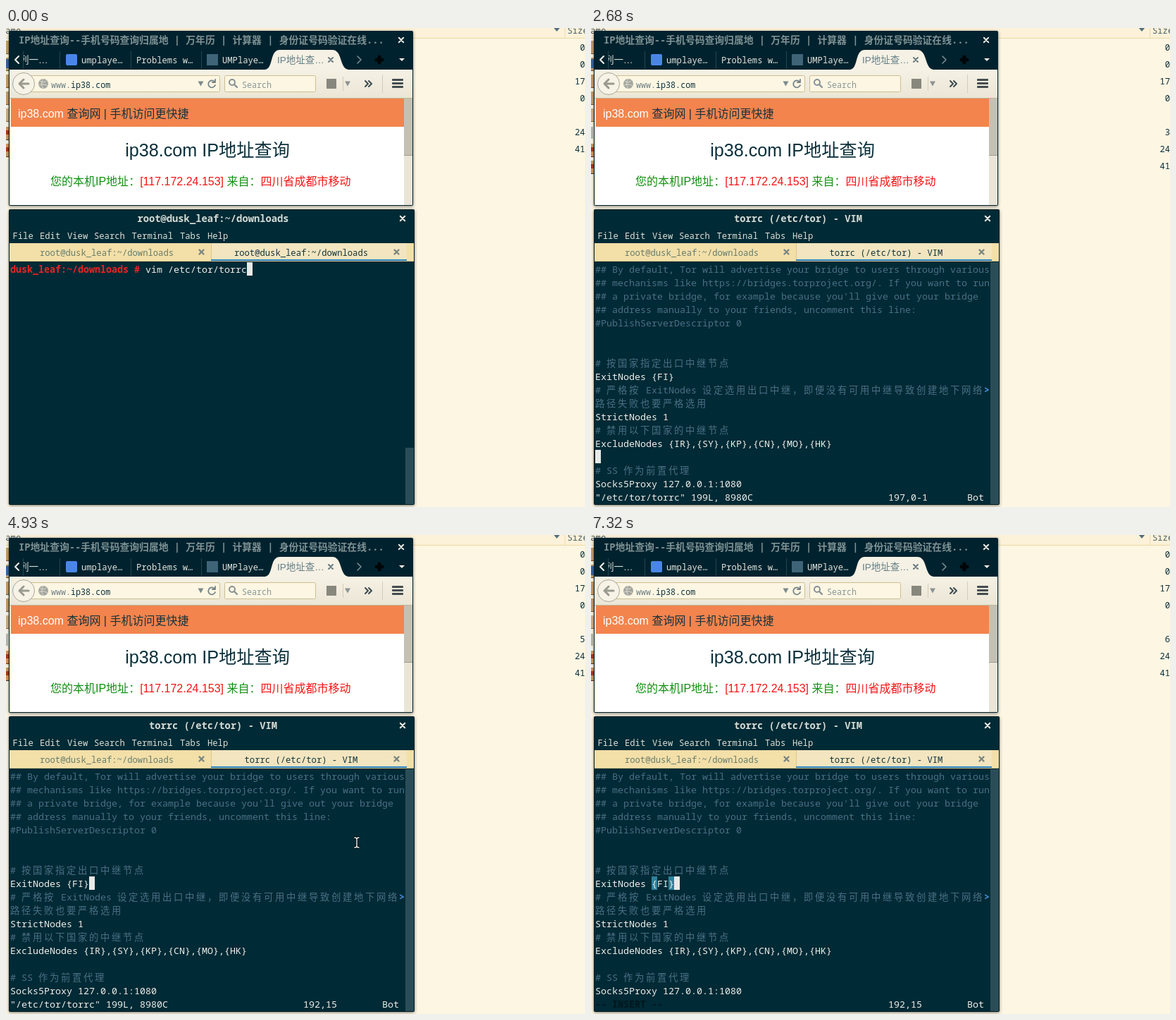
Animation of 822 by 679 pixels, one loop 8000 ms. Source, as an HTML page:

```html
<!DOCTYPE html>
<html lang="zh-CN">
<head>
<meta charset="utf-8">
<title>torrc</title>
<style>
  html, body { margin: 0; width: 100%; height: 100%; overflow: hidden; background: #fdf6e3; }
  svg { display: block; width: 822px; height: 679px; }
  text { white-space: pre; font-family: "Noto Sans Mono", "Noto Sans CJK SC", monospace; font-size: 12.2px; }
  .page { font-family: "Liberation Sans", "Noto Sans CJK SC", sans-serif; font-size: 16px; }
  .colon { font-family: "Noto Sans CJK TC", sans-serif; }
  .small { font-size: 13.5px; }
  .title { font-size: 13.8px; font-weight: bold; }
  .cell { font-size: 13.33px; }
  .mid { text-anchor: middle; }
  .end { text-anchor: end; }
  .bold { font-weight: bold; }
  .line { fill: none; stroke-linecap: round; stroke-linejoin: round; }
</style>
</head>
<body>
<svg id="stage" viewBox="0 0 822 679">
  <defs>
    <filter id="shadow" x="-5%" y="-5%" width="110%" height="110%">
      <feDropShadow dx="0" dy="1" stdDeviation="2" flood-color="#000" flood-opacity=".5"/>
    </filter>
    <linearGradient id="bar" x2="0" y2="1"><stop stop-color="#f5f1e4"/><stop offset="1" stop-color="#ebe6d6"/></linearGradient>
  </defs>
</svg>
<script>
const LOOP = 8000, CELL = 8, LINE = 19, LEFT = 6, TOP = 332;
const DARK = '#002b36', INK = '#0b303b', LIGHT = '#eeeeea', NOTE = '#4b6f85';
const stage = document.getElementById('stage');

function add(tag, attrs, parent = stage) {
  const el = document.createElementNS('http://www.w3.org/2000/svg', tag);
  for (const key in attrs) el.setAttribute(key, attrs[key]);
  return parent.appendChild(el);
}
const group = (attrs, parent) => add('g', attrs, parent);
const rect = (x, y, width, height, fill, parent, more) =>
  add('rect', { x, y, width, height, fill, ...more }, parent);
const path = (d, attrs, parent) => add('path', { d, ...attrs }, parent);
const line = (d, stroke, width = 1, parent) =>
  path(d, { class: 'line', stroke, 'stroke-width': width }, parent);
function text(x, y, content, fill, cls = '', parent) {
  const el = add('text', { x, y, fill, class: cls }, parent);
  el.textContent = content;
  return el;
}
const cross = (x, y, r, color, width) =>
  line(`M${x - r} ${y - r}l${2 * r} ${2 * r}m0 ${-2 * r}l${-2 * r} ${2 * r}`, color, width);
const down = (x, y, w, h, fill) => path(`M${x - w} ${y - h}h${2 * w}l${-w} ${2 * h}z`, { fill });

// Terminal text sits on a cell grid; CJK characters take two cells.
const isWide = c => c > '\u2e80';
const cellX = col => LEFT + col * CELL;
const rowY = row => TOP + row * LINE;
function gridText(row, col, content, fill, cls = '', parent) {
  const xs = [];
  for (const c of content) {
    xs.push(cellX(col));
    col += isWide(c) ? 2 : 1;
  }
  return text(xs.join(' '), rowY(row) + 15, content, fill, 'cell ' + cls, parent);
}

// File manager behind the windows
rect(0, 0, 822, 14, '#fcf2d9');
rect(0, 14, 822, 1, '#eed9a4');
rect(793, 0, 1, 14, '#eadbb4');
text(-8, 8, 'Name', '#3b525b');
down(782, 2, 5, 3, '#546e7a');
text(797, 8, 'Size', '#4b6068');

function folder(y, fill, edge, parent) {
  rect(0, y, 5, 19, fill, parent);
  rect(0, y + 18, 5, 1, edge, parent);
}
['0', '0', '17', '0'].forEach((size, i) => {
  text(822, 32 + 24 * i, size, INK, 'end');
  folder(18 + 24 * i, '#c9a06a', '#76512c');
});
rect(0, 44, 5, 13, '#3769a8');
folder(114, '#d6b283', '#8a6842');
const fresh = group();
const freshSize = text(822, 152, '0', INK, 'end', fresh);
rect(0, 140, 3, 17, '#b9bcb4', fresh);
const older = group();
['24', '41'].forEach((size, i) => {
  text(822, 152 + 24 * i, size, INK, 'end', older);
  folder(140 + 24 * i, '#d39a5d', '#4f3027', older);
  rect(0, 145 + 24 * i, 4, 6, '#b4371e', older);
});

// Browser window
rect(4, 4, 574, 248, '#00232d', stage, { filter: 'url(#shadow)', rx: 2 });
text(18, 22, 'IP地址查询--手机号码查询归属地 | 万年历 | 计算器 | 身份证号码验证在线...', '#7f9294', 'title');
cross(561, 17, 3.2, '#e6e8e3', 2);
text(19, 50, '列一…', '#d9dcd5', 'page small');
rect(8, 33, 16, 25, '#00232d');
line('M18 40l-5 5 5 5', '#f4f4ee', 2);
for (const x of [24, 76, 177, 277]) rect(x, 33, 1, 25, '#24464f');
rect(85, 37, 16, 16, '#4a86e8', stage, { rx: 2 });
text(107, 50, 'umplaye…', '#e2e4dd');
text(185, 50, 'Problems w…', '#e2e4dd');
rect(285, 37, 16, 16, '#3f6478');
text(307, 50, 'UMPlaye…', '#e2e4dd');
path('M368 59C380 57 374 31 389 31H463C478 31 473 57 486 59Z', { fill: '#f5f1e4' });
text(385, 50, 'IP地址查…', '#657f88', 'page small');
cross(461, 45, 3, '#6c7c80', 2);
line('M499 40l5 5-5 5', '#7b9096', 1.5);
line('M530 41v8m-4-4h8', '#000608', 5);
down(562, 45, 4, 2, '#f4f4ee');

rect(5, 59, 572, 40, 'url(#bar)');
rect(5, 99, 572, 1, '#bdb59b');
rect(30.5, 67.5, 273, 23, '#fdf6e3', stage, { stroke: '#cdbf91', rx: 2 });
add('circle', { cx: 25, cy: 79, r: 15.5, fill: '#f7f3e7', stroke: '#aaa797' });
line('M32 79H19m6-6l-6 6 6 6', '#9a9a90', 3);
add('circle', { cx: 53, cy: 79, r: 7, fill: '#a3a69f' });
line('M48 75q5 4 9 0M47 81q6-3 12 1M53 72q-5 7 0 14', '#dedccf', 1);
const url = text(64, 85, '', '#6f8286');
url.style.fontSize = '11.7px';
add('tspan', {}, url).textContent = 'www.';
add('tspan', { fill: INK }, url).textContent = 'ip38.com';
down(276.5, 79, 4, 3.5, '#7d8a8b');
line('M296 76a5 5 0 1 0 1 5m0-8v4h-4', '#748285', 1.8);
rect(310.5, 67.5, 129, 23, '#fdf6e3', stage, { stroke: '#cdbf91', rx: 2 });
add('circle', { cx: 321, cy: 77, r: 4, fill: 'none', stroke: '#879194', 'stroke-width': 2 });
line('M324 80l4 4', '#879194', 2.4);
text(335, 85, 'Search', '#8a9794').style.fontSize = '11.7px';
rect(455, 72, 14, 14, '#87877d');
rect(478, 69, 1, 20, '#d2ccba');
down(485, 79, 4, 3.5, '#8b9492');
line('M510 75l4 4-4 4m5-8l4 4-4 4', '#3c4b50', 2);
rect(534, 66, 1, 26, '#d2ccba');
for (const y of [72, 77, 82]) rect(548, y, 16, 3, '#454d50', stage, { rx: 1 });

rect(5, 100, 2, 151, '#eee8d5');
rect(7, 100, 558, 151, '#fff');
rect(7, 100, 558, 40, '#f3844d');
rect(565, 100, 12, 151, '#e9e5d8');
rect(565, 100, 12, 80, '#c3c1b5');
rect(565, 180, 12, 1, '#9e9c91');
function pageText(x, y, parts) {
  const el = text(x, y, '', INK, 'page');
  for (const [content, fill, cls = ''] of parts)
    add('tspan', { fill, class: cls }, el).textContent = content;
}
const GREEN = '#109010', RED = '#f51414';
pageText(17, 127, [['ip38.com ', '#fff'], ['查询网 | 手机访问更快捷', '#17323c']]);
text(286, 182, 'ip38.com IP地址查询', INK, 'page mid').style.fontSize = '25.2px';
pageText(63, 223, [['您的本机IP地址', GREEN], ['：', GREEN, 'colon'], ['[117.172.24.153]', RED],
  [' 来自', GREEN], ['：', GREEN, 'colon'], ['四川省成都市移动', RED]]);

// Terminal window
const HOME = 'root@dusk_leaf:~/downloads', VIM = 'torrc (/etc/tor) - VIM';
rect(4, 257, 576, 419, DARK, stage, { filter: 'url(#shadow)', rx: 2 });
rect(4.5, 257.5, 575, 418, 'none', stage, { stroke: '#001c24', rx: 2 });
const title = text(294, 275, HOME, '#d5dcd6', 'title mid');
cross(563, 270, 3.2, '#f1f3ee', 2);
const menu = { File: 9.5, Edit: 48, View: 87, Search: 125, Terminal: 178.5, Tabs: 247, Help: 286 };
for (const name in menu) text(menu[name], 299, name, '#dce0d8');
rect(5, 305, 574, 26, '#f3dfa8');
rect(291, 305, 278, 26, '#f2e5bf');
rect(291, 305, 1, 25, '#dcc88f');
rect(5, 330, 574, 1, '#d8c48c');
rect(291, 328, 278, 2, '#2a83c6');
text(143, 323, HOME, '#667d6c', 'mid');
const tab = text(419, 323, HOME, '#14343d', 'mid');
cross(277.5, 317.5, 3, '#7a8680', 2.4);
cross(554.5, 317.5, 3, '#7a8680', 2.4);
const scroll = rect(567, 595, 12, 80, '#2b4d57');

const shell = group();
gridText(0, 0, 'dusk_leaf:~/downloads #', '#ee2225', 'bold', shell);
gridText(0, 24, 'vim /etc/tor/torrc', LIGHT, '', shell);

const editor = group();
const rows = [
  '## By default, Tor will advertise your bridge to users through various',
  '## mechanisms like https://bridges.torproject.org/. If you want to run',
  "## a private bridge, for example because you'll give out your bridge",
  '## address manually to your friends, uncomment this line:',
  '#PublishServerDescriptor 0', '', '',
  '# 按国家指定出口中继节点',
  'ExitNodes {FI}',
  '# 严格按 ExitNodes 设定选用出口中继，即便没有可用中继导致创建地下网络',
  '路径失败也要严格选用',
  'StrictNodes 1',
  '# 禁用以下国家的中继节点',
  'ExcludeNodes {IR},{SY},{KP},{CN},{MO},{HK}', '',
  '# SS 作为前置代理',
  'Socks5Proxy 127.0.0.1:1080'
];
const braces = group({}, editor);
for (const col of [10, 13]) rect(cellX(col), rowY(8), CELL, LINE, '#2f819c', braces);
rows.forEach((row, i) =>
  gridText(i, 0, row, row[0] === '#' || i === 10 ? NOTE : LIGHT, '', editor));
gridText(9, 69, '>', '#4a90dc', 'bold', editor);
const fileInfo = gridText(17, 0, '"/etc/tor/torrc" 199L, 8980C', LIGHT, '', editor);
const insertInfo = gridText(17, 0, '-- INSERT --', '#00161d', 'bold', editor);
const position = text(cellX(52), rowY(17) + 15, '', LIGHT, 'cell', editor);
gridText(17, 66, 'Bot', LIGHT, '', editor);

const caret = rect(0, 0, CELL, LINE, '#e8eae8');
const caretChar = text(0, 0, '', DARK, 'cell');
const mouse = group();
const beam = 'M-3 -7q3 0 3 2V5q0 2 -3 2M3 -7q-3 0 -3 2M0 5q0 2 3 2';
line(beam, '#001015', 3.4, mouse);
line(beam, '#f6f6f2', 1.4, mouse);

// time, row, column, ruler
const caretSteps = [
  [0, 0, 42, ''], [1390, 1, 0, ''],
  [1440, 15, 15, '198,21-16'], [2680, 14, 0, '197,0-1'], [2940, 13, 41, '196,42'],
  [3430, 12, 22, '195,33-23'], [3470, 11, 12, '194,13'], [3510, 8, 14, '192,15'],
  [3550, 6, 0, '190,0-1'], [3880, 7, 22, '191,33-23'], [4170, 8, 14, '192,15'],
  [5050, 8, 13, '192,14'], [5170, 8, 12, '192,13'],
  [7080, 8, 13, '192,14'], [7140, 8, 14, '192,15']
];
const sizeSteps = [[0, ''], [1150, '0'], [2040, '3'], [3030, '5'], [5960, '6']];
const mouseSteps = [[4930, 498, 436], [4970, 500, 434], [5010, 502, 432], [5090, 503, 430], [5130, 504, 429]];
const at = (steps, t) => steps.findLast(step => step[0] <= t);
const show = (el, on) => el.setAttribute('visibility', on ? 'inherit' : 'hidden');

function charAt(row, col) {
  let c = 0;
  for (const ch of rows[row] || '') {
    if (c === col) return ch;
    c += isWide(ch) ? 2 : 1;
  }
  return '';
}

function draw(t) {
  const vim = t >= 1440, insert = t >= 7320;
  const [, row, col, ruler] = at(caretSteps, t);
  const under = vim ? charAt(row, col) : '';

  show(shell, !vim);
  show(editor, vim);
  title.textContent = tab.textContent = vim ? VIM : HOME;
  scroll.setAttribute('y', vim ? 332 : 595);
  scroll.setAttribute('height', vim ? 343 : 80);

  caret.setAttribute('x', cellX(col));
  caret.setAttribute('y', rowY(row));
  caret.setAttribute('width', under && isWide(under) ? 2 * CELL : CELL);
  caretChar.setAttribute('x', cellX(col));
  caretChar.setAttribute('y', rowY(row) + 15);
  caretChar.textContent = under;
  position.textContent = ruler;
  show(braces, vim && (insert || under === '}'));
  show(fileInfo, vim && !insert);
  show(insertInfo, insert);

  const size = at(sizeSteps, t)[1];
  show(fresh, size);
  freshSize.textContent = size;
  older.setAttribute('transform', `translate(0 ${size ? 24 : 0})`);

  const pointer = at(mouseSteps, t);
  show(mouse, pointer && t < 7080);
  if (pointer) mouse.setAttribute('transform', `translate(${pointer[1]} ${pointer[2]})`);
}

const start = performance.now();
function tick() {
  draw((performance.now() - start) % LOOP);
  requestAnimationFrame(tick);
}
tick();
</script>
</body>
</html>
```
